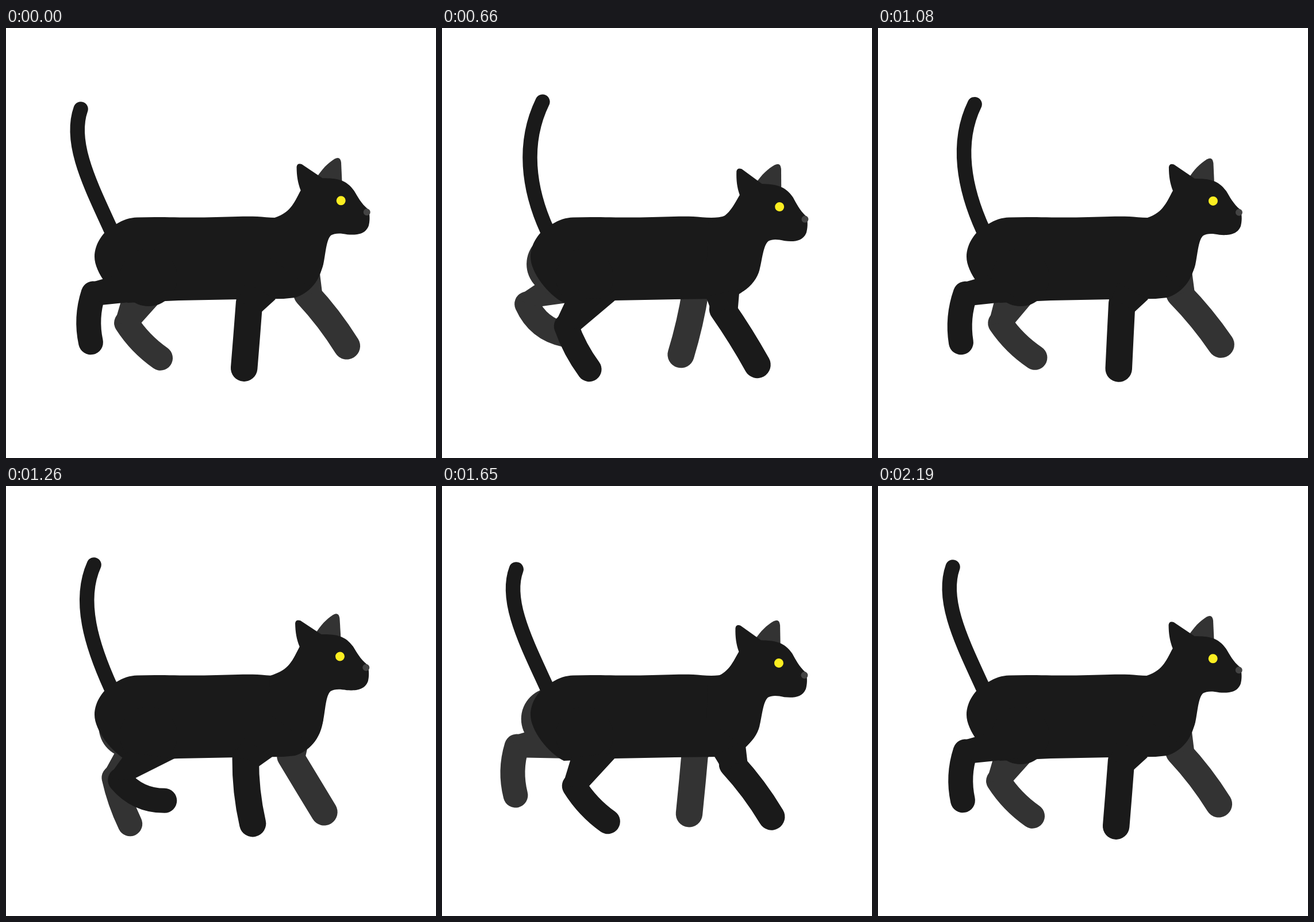
An HTML page with a canvas that plays this animation: 748 px wide and 748 px high, repeating every 2.22 s.

```html
<!DOCTYPE html>
<html>
<head>
<meta charset="utf-8">
<style>
html, body { margin: 0; width: 100%; height: 100%; overflow: hidden; background: #fff; }
canvas { display: block; }
</style>
</head>
<body>
<canvas id="stage" width="748" height="748"></canvas>
<script>
const ctx = document.getElementById('stage').getContext('2d');
const LOOP = 2220, FRAME = 30, STEP = 1095, SWAY = 2 * STEP;
const DARK = '#1a1a1a', FAR = '#333', DEG = Math.PI / 180;

// Key poses: time, then degrees forward from straight down for thigh, shin, arm, forearm
const WALK = [
  [0, -66, -3, -31, -4.5],
  [112, -48, 51, -31, -13],
  [217, -7, 70, -35, 30],
  [352, 18, 50, 14.5, 72],
  [547, -8, 44, 23, 37.5],
  [765, -25.5, 11.5, -2.5, 29.5],
  [900, -48, 0, -14.5, 20]
];
// rear and front: where the limb meets the body, as [along, across] the upper bone
const BACK = { upper: 103, lower: 85, width: 43, rear: [55, -13], front: [33, 70], gain: .28, rest: 22 };
const FRONT = { upper: 91, lower: 114, width: 46.5, rear: [64, -24], front: [62, 36], gain: .45, rest: 27 };
const BELLY = 474;

// Smooth periodic curve through the key poses
function pose(time) {
  const n = WALK.length, t = time % STEP;
  const key = i => WALK[(i + n) % n];
  const at = i => key(i)[0] + Math.floor(i / n) * STEP;
  const i = WALK.findLastIndex(k => k[0] <= t);
  const h = at(i + 1) - at(i), u = (t - at(i)) / h;
  return key(i).slice(1).map((a, j) => {
    const b = key(i + 1)[j + 1];
    const ma = (b - key(i - 1)[j + 1]) / (at(i + 1) - at(i - 1)) * h;
    const mb = (key(i + 2)[j + 1] - a) / (at(i + 2) - at(i)) * h;
    return a + u * (ma + u * (3 * (b - a) - 2 * ma - mb + u * (2 * (a - b) + ma + mb)));
  });
}

// Point at a distance along and across a direction, in degrees from straight down
function reach([x, y], angle, along, across = 0) {
  const s = Math.sin(angle * DEG), c = Math.cos(angle * DEG);
  return [x + along * s + across * c, y + along * c - across * s];
}

function fill(path, color) {
  ctx.fillStyle = color;
  ctx.fill(new Path2D(path));
}

function disc(x, y, r, color) {
  ctx.fillStyle = color;
  ctx.beginPath();
  ctx.arc(x, y, r, 0, 7);
  ctx.fill();
}

function stroke(path, width, color) {
  ctx.lineCap = 'round';
  ctx.lineWidth = width;
  ctx.strokeStyle = color;
  ctx.stroke(new Path2D(path));
}

function limb(part, hip, top, low, color) {
  const r = part.width / 2;
  const knee = reach(hip, top, part.upper), foot = reach(knee, low, part.lower);
  const bend = part.gain * (low - top - part.rest);
  const bow = reach(knee, low, part.lower / 2, -bend);
  const start = Math.atan2(bow[0] - knee[0], bow[1] - knee[1]) / DEG;
  const rear = reach(hip, top, ...part.rear), front = reach(hip, top, ...part.front);
  front[1] = Math.min(front[1], BELLY);
  const slant = Math.atan2(knee[0] - rear[0], knee[1] - rear[1]) / DEG;
  const outer = reach(knee, slant, 0, -r), inner = reach(knee, start, 14, r - .5);
  stroke(`M${knee}Q${bow} ${foot}`, part.width, color);
  fill(`M${rear}L${outer}L${knee}L${inner}L${front}Z`, color);
}

function tail(t) {
  const w = t / SWAY * 360;
  const sin = a => Math.sin(a * DEG);
  const x = 148.5 + 26.6 * sin(w - 44) - 3.9 * sin(2 * w), y = 137 - 8.8 * sin(w - 27);
  const u = (x - 130) / 45;
  stroke(`M183,352C${148 + 2 * u},${275 + 5 * u} ${109 + 31 * u},200 ${x},${y}`, 25.5, DARK);
}

function head(t) {
  ctx.save();
  ctx.translate(298, 425);
  ctx.rotate((3 - 7.6 * Math.cos((t - 185) / STEP * 2 * Math.PI)) / 285);
  ctx.translate(-298, -425);
  fill('M540,262C550,246 560,236 572,228.500Q582,223 583.500,235L585,270Z', FAR);
  fill(`M460,333C480,327 488,321 495,313C502,305 507,294 513,283C508,270 506,258 506,242
    Q507,235 515,237.500L551,262C575,262 592,264 606,284C612,294 618,306 630,316
    C634,325 633,338 631,345C625,360 610,361 594,360C580,357 572,358 566,361
    C557,368 556,395 552,412C549,425 540,440 525,450L460,400Z`, DARK);
  disc(628, 321, 6, '#444');
  disc(583, 301, 8, '#fcee21');
  ctx.restore();
}

function draw(t) {
  ctx.fillStyle = '#fff';
  ctx.fillRect(0, 0, 748, 748);
  const [thigh, shin, arm, forearm] = pose(t);
  const [thigh2, shin2, arm2, forearm2] = pose(t + STEP / 2);
  limb(FRONT, [488, 379], arm2, forearm2, FAR);
  limb(BACK, [224, 411], thigh2, shin2, FAR);
  disc(226 + .52 * thigh2, 425 + .3 * thigh2, 54, FAR);
  tail(t);
  fill(`M190,342C205,333 215,330 228,329.500C265,328 300,330 345,329.500
    C380,329 410,327 437,328C455,329 475,333 494,326L520,380L552,405
    C548,442 525,462 503,469L483,471L405,472L300,474L212,478
    C185,465 154,425 154,398C154,375 170,352 190,342Z`, DARK);
  disc(248, 434, 50, DARK);
  limb(BACK, [246, 420], thigh, shin, DARK);
  limb(FRONT, [470, 400], arm, forearm, DARK);
  head(t);
}

let begin;
function tick(now) {
  begin ??= now;
  const t = (now - begin) % LOOP;
  draw(Math.floor(t / FRAME) * FRAME % SWAY);
  requestAnimationFrame(tick);
}
draw(0);
requestAnimationFrame(tick);
</script>
</body>
</html>
```
